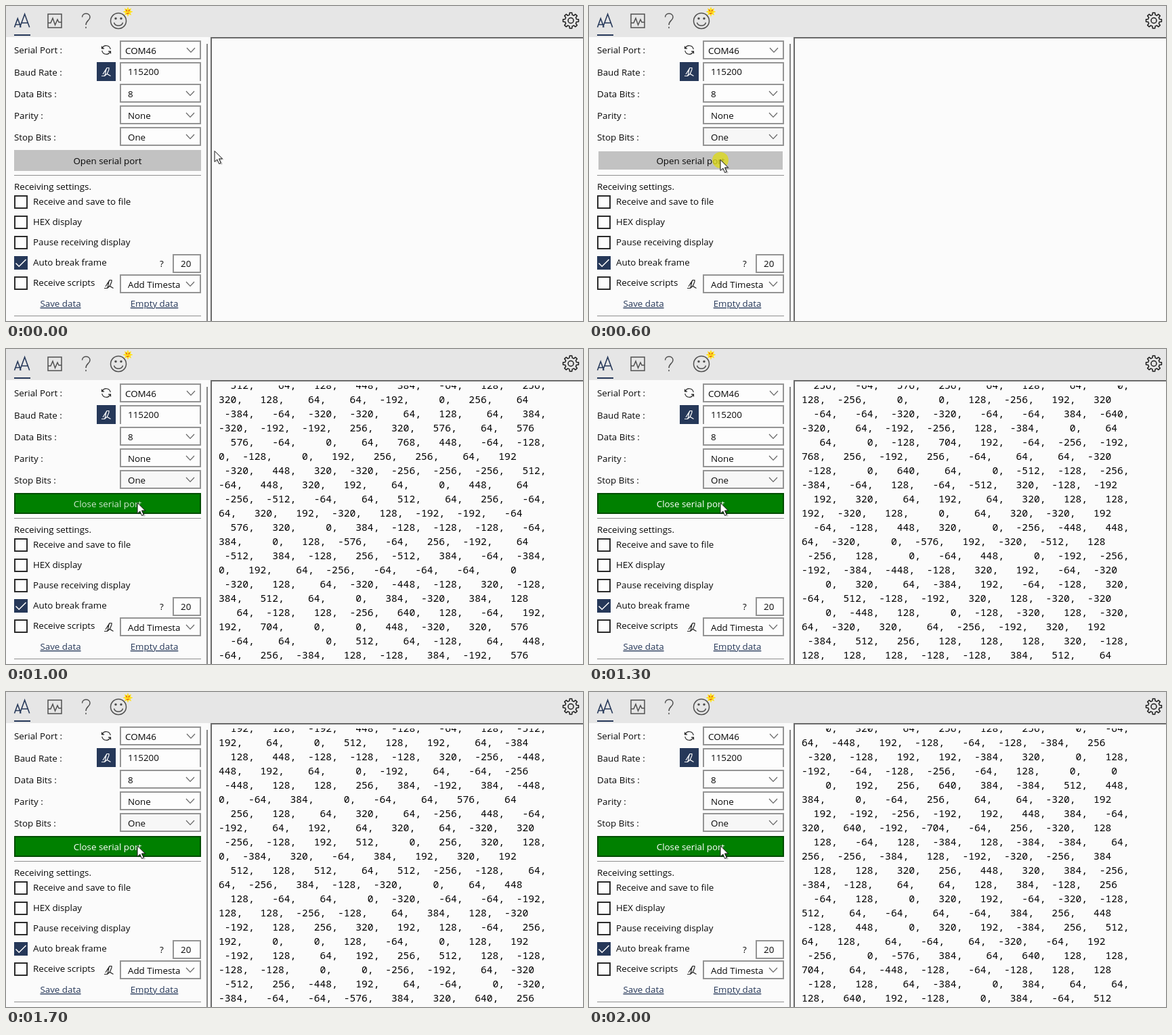
These frames come from a looping animation (852 by 466 pixels, 2.1 s). An HTML page:

```html
<!DOCTYPE html>
<html lang="en">
<head>
<meta charset="utf-8">
<title>Serial monitor</title>
<style>
  html, body { margin: 0; width: 100%; height: 100%; overflow: hidden; background: #fbfbfb; }
  svg { position: absolute; left: 0; top: 0; }
  text { font: 13.35px "Open Sans", "Noto Sans", sans-serif; fill: #080808; }
  .mid { text-anchor: middle; }
  .link { fill: #263859; text-decoration: underline; }
  .box { fill: #fdfdfd; stroke: #949494; stroke-width: 2; }
  .check { fill: #fdfdfd; stroke: #2b2b2b; stroke-width: 2; }
  .line { fill: none; stroke: #505050; stroke-width: 1.5; }
  .navy { fill: #263859; }

  /* 20 rows of 21px make one screen; the strip jumps one screen every 100 ms */
  #view { position: absolute; left: 314px; top: 54px; width: 538px; height: 409px; overflow: hidden; }
  #log {
    position: absolute; left: 0; top: -11px; margin: 0;
    font: 14.66px/21px "Noto Sans Mono", "DejaVu Sans Mono", monospace; color: #000;
  }

  #log, #cursor, #button, #open, #close, #spot, #stop { animation: 2.1s -2ms step-end infinite; }
  #log { animation-name: pages; animation-timing-function: steps(21); }
  #cursor { animation-name: move; }
  #button { animation-name: press; stroke-width: 2; }
  #open { animation-name: open; }
  #close { animation-name: close; }
  #spot { animation-name: spot; }
  #stop { animation-name: hover; }

  @keyframes pages { from { top: -11px; } to { top: -8831px; } }
  @keyframes move {
    0% { transform: translate(308px, 214px); }
    4.762% { transform: translate(286px, 210px); }
    9.524% { transform: translate(242px, 203px); }
    14.286% { transform: translate(209px, 203px); }
    19.048%, 100% { transform: translate(194px, 227px); }
  }
  @keyframes press {
    0% { fill: #c2c2c2; stroke: #c2c2c2; }
    19.048% { fill: #c2c2c2; stroke: #7a7a7a; }
    28.571% { fill: #c2c2c2; stroke: #fbfbfb; }
    38.095% { fill: #c2c2c2; stroke: #7a7a7a; }
    42.857%, 100% { fill: #008000; stroke: #004c00; }
  }
  @keyframes open { 0% { opacity: 1; } 42.857%, 100% { opacity: 0; } }
  @keyframes close {
    0% { opacity: 0; fill: #cfe5cf; }
    42.857% { opacity: 1; fill: #cfe5cf; }
    52.381%, 100% { opacity: 1; fill: #fff; }
  }
  @keyframes spot { 0% { opacity: 0; } 28.571% { opacity: 1; } 38.095%, 100% { opacity: 0; } }
  @keyframes hover { 0% { fill: #fdfdfd; } 9.524%, 100% { fill: #f7f7f7; } }
</style>
</head>
<body>
<svg width="852" height="466" viewBox="0 0 852 466">
  <defs>
    <path id="chevron" d="M0 0l6 6.3l6-6.3" fill="none" stroke="#666" stroke-width="1.2"/>
    <path id="quill" d="M-7 6.5H-2.500C0 3-2-2 1-5.500H4C5-1 1 1 1.500 3.500L6.500 6.500M-5 4L0-4M-2.500 6.500L1.500 3"
      fill="none" stroke-width="1.2"/>
  </defs>

  <!-- toolbar -->
  <rect width="852" height="46" fill="#e6e6e6"/>
  <path d="M12.5 31.5L17.2 18.5L22 31.5M14 27.5H20.5M20.5 31.5L27.6 12L34.7 31.5M23 25H32.3"
    fill="none" stroke="#263859" stroke-width="1.6"/>
  <rect class="navy" x="12" y="42" width="24" height="2"/>
  <rect class="line" x="62" y="12" width="20" height="20"/>
  <path class="line" d="M62 25h4l3-7l3.5 10l3.5-8l2 4h4"/>
  <path class="line" d="M112.5 16.5C112.5 9.5 124 9.5 124 16.5C124 21.5 118 21.5 118 28M118 30.8v2.2"/>
  <circle class="line" cx="166" cy="22" r="11.5"/>
  <path class="line" d="M159.5 24.5C161 30.5 171 30.5 172.5 24.5"/>
  <circle cx="162" cy="18.5" r="1.7" fill="#505050"/>
  <circle cx="170" cy="18.5" r="1.7" fill="#505050"/>
  <path id="spark" fill="#ffe01a"/>
  <path d="M177 5.5l2 2.5M182.500 5.500l-1.500 2.500M178 11.500l3.500-1" stroke="#d8301c" stroke-width="1.1"/>
  <path id="gear" fill="none" stroke="#1c1c1c" stroke-width="1.5" stroke-linejoin="round"/>
  <circle cx="834" cy="21.5" r="4" fill="none" stroke="#1c1c1c" stroke-width="1.5"/>

  <!-- frame of the log and the thin scroll bar -->
  <path d="M852 47H303V466" fill="none" stroke="#696969" stroke-width="2"/>
  <rect x="296" y="56" width="2" height="410" fill="#858585"/>

  <!-- port settings -->
  <text x="12" y="70">Serial Port :</text>
  <text x="12" y="103">Baud Rate :</text>
  <text x="12" y="135">Data Bits :</text>
  <text x="12" y="167">Parity :</text>
  <text x="12" y="199">Stop Bits :</text>
  <path d="M142.200 62.500A6.300 6.300 0 0 1 154.200 64M153.800 67.500A6.300 6.300 0 0 1 141.800 66M141.500 59.500V62.800H145M154.500 70.500V67.200H151"
    fill="none" stroke="#222" stroke-width="1.2"/>
  <rect class="navy" x="134" y="83" width="28" height="28"/>
  <use href="#quill" x="148" y="97" stroke="#fff"/>

  <rect class="box" x="169" y="52" width="118" height="26"/>
  <path class="box" d="M169 111V84H287V111"/>
  <rect class="box" x="169" y="116" width="118" height="26"/>
  <rect class="box" x="169" y="148" width="118" height="26"/>
  <rect class="box" id="stop" x="169" y="180" width="118" height="26"/>
  <text x="176" y="71">COM46</text>
  <text x="180" y="102">115200</text>
  <text x="180" y="135">8</text>
  <text x="180" y="167">None</text>
  <text x="180" y="199">One</text>
  <use href="#chevron" x="267" y="62"/>
  <use href="#chevron" x="266" y="126"/>
  <use href="#chevron" x="266" y="158"/>
  <use href="#chevron" x="266" y="190"/>

  <rect id="button" x="13" y="214" width="274" height="29"/>
  <text class="mid" id="open" x="150" y="234">Open serial port</text>
  <text class="mid" id="close" x="150" y="234">Close serial port</text>
  <path d="M12 250.5H288M12 458.5H288" stroke="#8f8f8f"/>

  <!-- receiving settings -->
  <text x="12" y="272">Receiving settings.</text>
  <rect class="check" x="13" y="281" width="18" height="18"/>
  <rect class="check" x="13" y="311" width="18" height="18"/>
  <rect class="check" x="13" y="341" width="18" height="18"/>
  <rect class="navy" x="12" y="370" width="20" height="20"/>
  <path d="M14.5 380.5l4.700 4.700L29.5 375" fill="none" stroke="#fff" stroke-width="1.5"/>
  <rect class="check" x="13" y="401" width="18" height="18"/>
  <text x="40" y="294">Receive and save to file</text>
  <text x="40" y="324">HEX display</text>
  <text x="40" y="354">Pause receiving display</text>
  <text x="40" y="384">Auto break frame</text>
  <text x="40" y="414">Receive scripts</text>
  <text x="227" y="386">?</text>
  <rect class="box" x="247" y="368" width="40" height="26"/>
  <text x="258" y="386">20</text>
  <use href="#quill" x="152" y="411" stroke="#222"/>
  <rect class="box" x="169" y="398" width="118" height="26"/>
  <text x="180" y="417">Add Timesta</text>
  <use href="#chevron" x="266" y="408"/>
  <text class="link mid" x="80.5" y="445">Save data</text>
  <text class="link mid" x="219" y="445">Empty data</text>
</svg>

<div id="view"><pre id="log"></pre></div>

<svg width="852" height="466" viewBox="0 0 852 466">
  <circle id="spot" cx="194" cy="228" r="12" fill="#dcd81e" fill-opacity=".8"/>
  <g id="cursor">
    <path d="M2 2V18L6 14.5L9 21L12 20L9 13.5H14Z" opacity=".18"/>
    <path d="M0 .5V16.5L3.8 13L6.6 19.5L9.3 18.3L6.5 12H11.5Z" fill="#fff" stroke="#111"/>
  </g>
</svg>

<script>
  const $ = id => document.getElementById(id);

  // Ring of teeth: each tooth takes two outer and two inner corners.
  function cog(cx, cy, teeth, outer, inner, spread) {
    const points = [];
    for (let i = 0; i < teeth; i++) {
      for (const [r, k] of [[inner, -.5 + spread], [outer, -spread], [outer, spread], [inner, .5 - spread]]) {
        const a = (i + k) / teeth * 2 * Math.PI;
        points.push((cx + r * Math.sin(a)).toFixed(2) + ' ' + (cy - r * Math.cos(a)).toFixed(2));
      }
    }
    return 'M' + points.join('L') + 'Z';
  }
  $('gear').setAttribute('d', cog(834, 21.5, 8, 11.6, 8.6, .19));
  $('spark').setAttribute('d', cog(180, 8.5, 8, 7, 4, .04));

  let seed = 46;
  function random() {
    seed = (Math.imul(seed, 1664525) + 1013904223) >>> 0;
    return seed / 4294967296;
  }

  // Samples come in bell-shaped noise, quantised to 64.
  function sample() {
    const bell = random() + random() + random() + random() - 2;
    return String(64 * Math.round(bell * 7.5 + .6) || 0);
  }

  // A line of 16 samples wraps after eight, which eats the padding there.
  function lines() {
    const values = Array.from({ length: 16 }, sample);
    const join = (row, first) => row.map((v, i) => v.padStart(i ? 6 : first)).join(',');
    return join(values.slice(0, 8), 5) + ',\n' + join(values.slice(8), 0) + '\n';
  }

  // Nine empty screens come before the twelve filled ones.
  $('log').textContent = '\n'.repeat(9 * 20) + Array.from({ length: 120 }, lines).join('');
</script>
</body>
</html>
```
